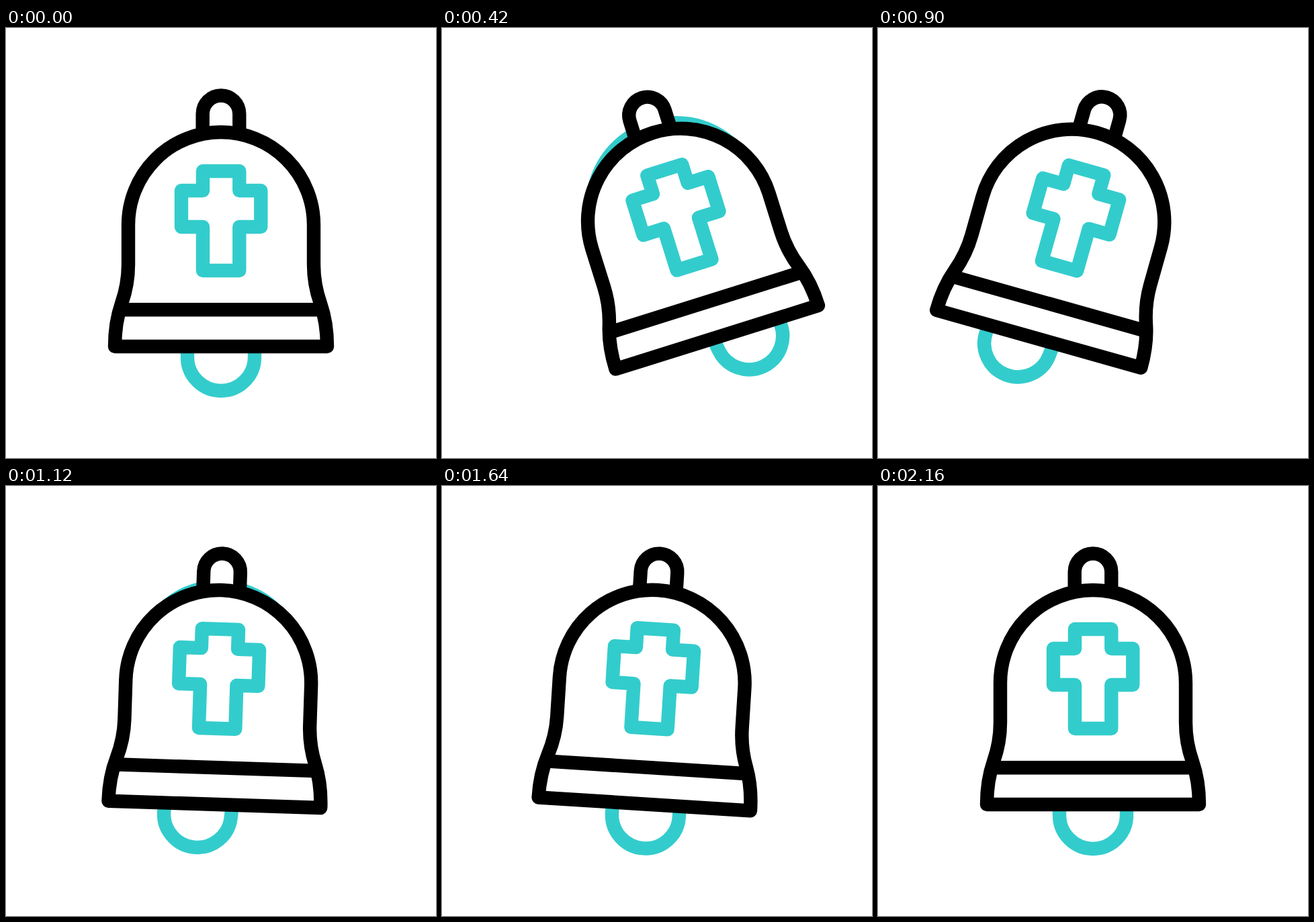
An HTML page that plays this animation: 640 px wide and 640 px high, repeating every 2.4 s.

```html
<!DOCTYPE html>
<html lang="en">
<head>
<meta charset="utf-8">
<title>Ringing bell</title>
<style>
  html, body { margin: 0; width: 100%; height: 100%; overflow: hidden; background: #fff; }
  svg { display: block; width: 100vw; height: 100vh; }
</style>
</head>
<body>
<svg viewBox="0 0 640 640" fill="none" stroke-width="20.4" stroke-linecap="round" stroke-linejoin="round">
  <path id="waves" stroke="#33cccc"/>
  <path id="clapper" stroke="#33cccc" d="M270 470V490A50 50 0 0 0 370 490V470"/>
  <g id="bell" stroke="#000">
    <path fill="#fff" stroke-linecap="butt" d="M292.7 156V127.8a27.3 27.3 0 0 1 54.6 0V156"/>
    <path fill="#fff" d="M182 293A138 138 0 0 1 458 293V352C458 374 461 390 468 410C475 430 478 452 478 474H162C162 452 165 430 172 410C179 390 182 374 182 352Z"/>
    <path d="M170 419.3H470"/>
    <path stroke="#33cccc" d="M293 213H347.3V242H379.3V296H347.3V361H293V296H261V242H293Z"/>
  </g>
</svg>
<script>
const LOOP = 2400;
const PIVOT = "320 176";
const WAVE_GAP = 16.9 * Math.PI / 180;
const waveStarts = [300, 1040];

// [time in ms, angle in degrees]
const bellKeys = [[0, 0], [398, -18], [886, 16], [1295, -8], [1708, 5.1], [2010, 0]];
const clapperKeys = [[0, 0], [430, -26], [930, 22], [1340, -12], [1730, 6.5], [2100, 0]];

const bell = document.getElementById("bell");
const clapper = document.getElementById("clapper");
const waves = document.getElementById("waves");

const clamp = x => Math.min(1, Math.max(0, x));

// Cubic bezier (1/6, 0, 5/6, 1), solved by bisection
function ease(u) {
  let low = 0, high = 1;
  for (let i = 0; i < 24; i++) {
    const s = (low + high) / 2, r = 1 - s;
    const x = r * r * s / 2 + 2.5 * r * s * s + s * s * s;
    if (x < u) low = s; else high = s;
  }
  return low * low * (3 - 2 * low);
}

function angleAt(keys, t) {
  const i = keys.findIndex(key => key[0] > t);
  if (i < 1) return 0;
  const [t0, a0] = keys[i - 1], [t1, a1] = keys[i];
  return a0 + (a1 - a0) * ease((t - t0) / (t1 - t0));
}

function wavePath(radius) {
  const y = 250 + 0.16 * radius;
  const dx = radius * Math.sin(WAVE_GAP);
  const top = y - radius * Math.cos(WAVE_GAP);
  const arc = `A${radius} ${radius} 0 0 1`;
  return `M${320 - radius} ${y}${arc} ${320 - dx} ${top}` +
         `M${320 + dx} ${top}${arc} ${320 + radius} ${y}`;
}

function drawWaves(t, turn) {
  const start = waveStarts.find(s => t >= s && t < s + 595);
  waves.setAttribute("visibility", start === undefined ? "hidden" : "visible");
  if (start === undefined) return;
  const age = t - start;
  waves.setAttribute("d", wavePath(Math.min(180, 108.8 + 0.128 * age)));
  waves.setAttribute("opacity", 1 - clamp((age - 365) / 230));
  waves.setAttribute("transform", turn);
}

function draw(t) {
  const turn = `rotate(${angleAt(bellKeys, t)} ${PIVOT})`;
  bell.setAttribute("transform", turn);
  clapper.setAttribute("transform", `rotate(${angleAt(clapperKeys, t)} ${PIVOT})`);
  drawWaves(t, turn);
}

const begin = performance.now();
function tick() {
  draw((performance.now() - begin) % LOOP);
  requestAnimationFrame(tick);
}
tick();
</script>
</body>
</html>
```
